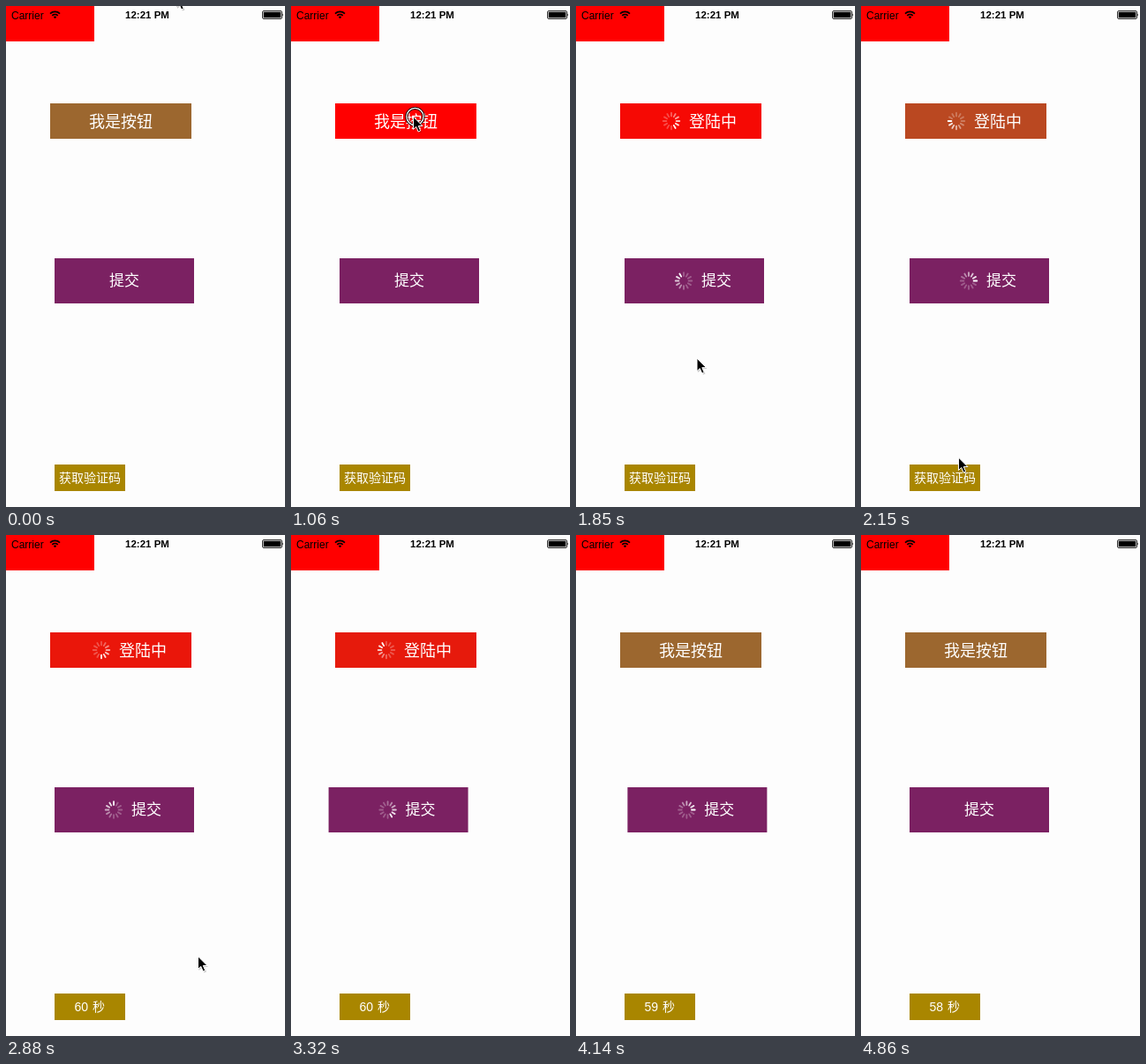
These frames come from a looping animation (316 by 566 pixels, 5.23 s). An HTML page:

```html
<!DOCTYPE html>
<html lang="zh-CN">
<head>
<meta charset="utf-8">
<title>Buttons</title>
<style>
  html, body { margin: 0; width: 100%; height: 100%; overflow: hidden; background: #fdfdfd; }
  svg { display: block; width: 316px; height: 566px; }
  text { font-family: "Liberation Sans", "Noto Sans CJK SC", "Noto Sans CJK", sans-serif; }
  .cjk { font-family: "Noto Sans CJK SC", "Noto Sans CJK", "Noto Sans CJK JP", sans-serif; font-weight: 300; fill: #fff; }
</style>
</head>
<body>
<svg viewBox="0 0 316 566">
  <rect width="316" height="566" fill="#fdfdfd"/>
  <rect width="100" height="40" fill="#f00"/>

  <text x="6" y="14.5" font-size="12">Carrier</text>
  <text x="160" y="14.3" font-size="11.5" font-weight="700" text-anchor="middle">12:21 PM</text>
  <g fill="none" stroke="#000" stroke-width="1.7">
    <path d="M50 8.6A8 8 0 0 1 61 8.6M52.3 10.9A4.7 4.7 0 0 1 58.7 10.9"/>
    <path d="M55.5 14.3L53.8 12.4A2.4 2.4 0 0 1 57.2 12.4Z" fill="#000" stroke="none"/>
  </g>
  <rect x="290.5" y="5.5" width="22" height="9" rx="1.5" fill="none" stroke="#000" stroke-width=".8"/>
  <rect x="291.7" y="6.7" width="19.6" height="6.6" fill="#000"/>
  <path d="M313.4 8.4Q315 10 313.4 11.6Z"/>

  <g id="login">
    <rect id="loginBox" x="50" y="110" width="160" height="40"/>
    <text id="loginText" class="cjk" y="136.7" font-size="18"></text>
    <g id="loginSpin" transform="translate(108 130)"></g>
  </g>
  <g id="submit">
    <rect x="55" y="285" width="158" height="51" fill="#7b2162"/>
    <text id="submitText" class="cjk" y="316.4" font-size="17">提交</text>
    <g id="submitSpin" transform="translate(122 310.5)"></g>
  </g>
  <rect x="55" y="518" width="80" height="30" fill="#a98600"/>
  <text id="codeText" class="cjk" x="60" y="538" font-size="14">获取验证码</text>
  <g id="count" fill="#fff" font-size="14">
    <text id="seconds" x="77.5" y="538"></text>
    <text class="cjk" x="98" y="538">秒</text>
  </g>

  <g id="cursor">
    <g id="ring" fill="none">
      <circle cx="2.5" cy="0" r="9.6" stroke="#000" stroke-width="3"/>
      <circle cx="2.5" cy="0" r="9.6" stroke="#fff" stroke-width="1.3"/>
    </g>
    <path d="M1.5 1.5V16L5 13L7.5 18.5L10 17.5L7.7 12H12Z" fill="#000" opacity=".2"/>
    <path d="M.5 0V14.4L3.8 11.4L6.2 17L8.7 15.9L6.3 10.5H11Z" fill="#000" stroke="#fff" stroke-width="1"/>
  </g>
</svg>
<script>
const LOOP = 5230;
const BROWN = [156, 103, 47], RED = [255, 0, 0];
const $ = id => document.getElementById(id);
const show = (el, on) => el.setAttribute('visibility', on ? 'visible' : 'hidden');
const during = (t, a, b) => t >= a && t < b;
const move = (el, x, y) => el.setAttribute('transform', `translate(${x} ${y})`);

// time, x, y of the pointer tip
const pointerPath = [
  [0, 192.5, -13], [30, 192, -12], [180, 160, 25], [420, 61, 46], [550, 92, 50],
  [580, 96, 52], [670, 138, 125], [1230, 138, 125], [1440, 157, 338],
  [1540, 150, 331], [1720, 150, 331], [2050, 116, 500], [2150, 110, 510],
  [2300, 104, 521], [2690, 104, 521], [2860, 217, 476], [3250, 217, 476]
];
const clicks = [[1060, 1200], [1540, 1660], [2560, 2700]];

function pointerAt(t) {
  const i = pointerPath.findIndex(p => p[0] > t);
  if (i < 0) return pointerPath[pointerPath.length - 1].slice(1);
  const [t0, x0, y0] = pointerPath[i - 1], [t1, x1, y1] = pointerPath[i];
  const k = (t - t0) / (t1 - t0);
  return [x0 + (x1 - x0) * k, y0 + (y1 - y0) * k];
}

function buildSpinner(g) {
  for (let i = 0; i < 12; i++) {
    const spoke = document.createElementNS('http://www.w3.org/2000/svg', 'path');
    spoke.setAttribute('d', 'M0 -5.6V-9.3');
    spoke.setAttribute('stroke', '#fff');
    spoke.setAttribute('stroke-width', 1.8);
    spoke.setAttribute('stroke-linecap', 'round');
    spoke.setAttribute('transform', `rotate(${i * 30})`);
    g.append(spoke);
  }
}

function spin(g, head) {
  [...g.children].forEach((spoke, i) => {
    const age = ((head - i) % 12 + 12) % 12;
    spoke.setAttribute('opacity', Math.max(.27, 1 - age * .13));
  });
}

// share of brown in the first button
function brownShare(t) {
  if (t < 1060 || t >= 3780) return 1;
  if (t < 1716) return 0;
  return (1 - Math.cos((t - 1716) / 688 * Math.PI)) / 2;
}

function shakeOffset(t) {
  if (!during(t, 3190, 4480)) return 0;
  const n = (t - 3190) / 183.5;
  const size = n < 3 ? 16.5 - n * .9 : 12.5 * Math.pow(.66, n - 3.5);
  return -size * Math.sin(n * Math.PI);
}

function draw(t) {
  const steps = Math.floor((t - 1530) / (1000 / 12));

  const loading = during(t, 1340, 3700);
  const share = brownShare(t);
  const rgb = RED.map((c, i) => Math.round(c + (BROWN[i] - c) * share));
  $('loginBox').setAttribute('fill', `rgb(${rgb})`);
  $('loginText').textContent = loading ? '登陆中' : '我是按钮';
  $('loginText').setAttribute('x', loading ? 128 : 94);
  show($('loginSpin'), loading);
  spin($('loginSpin'), steps + 2);
  const pop = during(t, 1070, 1340) ? Math.sin((t - 1070) / 270 * Math.PI) : 0;
  $('login').setAttribute('transform',
    `translate(130 130) scale(${1 + .1 * pop} ${1 + .2 * pop}) translate(-130 -130)`);

  const sending = during(t, 1650, 4590);
  $('submitText').setAttribute('x', sending ? 142 : 117);
  show($('submitSpin'), sending);
  spin($('submitSpin'), steps + 8);
  move($('submit'), shakeOffset(t), 0);

  const counting = t >= 2700;
  show($('codeText'), !counting);
  show($('count'), counting);
  $('seconds').textContent = t >= 4860 ? 58 : t >= 3720 ? 59 : 60;

  const present = t < 3250;
  show($('cursor'), present);
  show($('ring'), present && clicks.some(([a, b]) => during(t, a, b)));
  move($('cursor'), ...pointerAt(t));
}

buildSpinner($('loginSpin'));
buildSpinner($('submitSpin'));
const start = performance.now();
function tick() {
  draw((performance.now() - start) % LOOP);
  requestAnimationFrame(tick);
}
tick();
</script>
</body>
</html>
```
